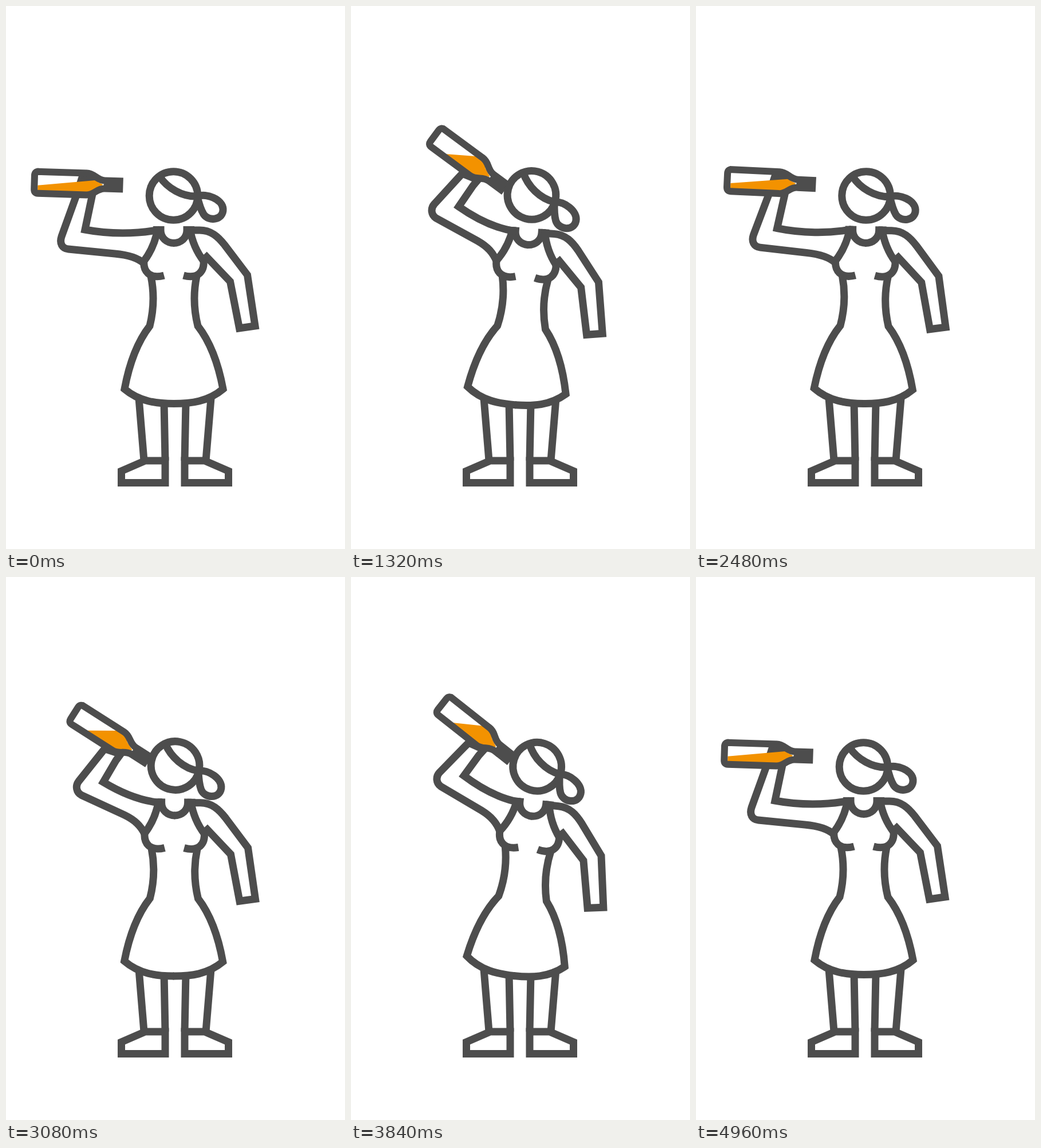
Recreate the animation shown at these times as an HTML page. Size 592 by 947 pixels, loop 5000 ms.

```html
<!DOCTYPE html>
<html lang="en">
<head>
<meta charset="utf-8">
<title>Drinking from a bottle</title>
<style>
  html, body { margin: 0; width: 100%; height: 100%; overflow: hidden; background: #fff; }
  svg { display: block; width: 100%; height: 100%; }
  .ink { fill: none; stroke: #4d4d4d; stroke-width: 13; stroke-miterlimit: 10; }
</style>
</head>
<body>
<svg viewBox="0 0 592 947">
  <defs>
    <clipPath id="hollow">
      <path d="M-150 -14H-64Q-55 -13 -50 -7L-35 0L-50 10Q-55 13 -64 14H-150Z"/>
    </clipPath>
    <g id="leg">
      <path d="M232 684L241 793M276 692L278 793"/>
      <path d="M278 793V831.5H201.5V811L243 793Z"/>
    </g>
    <g id="dressHalf">
      <path d="M265 388C261 412 251 432 240 446"/>
      <path d="M241 443C239 462 250 477 276 470"/>
      <path d="M253 471C259 500 258 530 251 558C230 585 215 625 207 668C233 690 263 693.5 294 693.5"/>
      <path d="M270 384V391C270 404 280 413.5 294 413.5"/>
    </g>
  </defs>
  <g class="ink">
    <use href="#leg"/>
    <use href="#leg" transform="matrix(-1 0 0 1 590 0)"/>
    <g id="body">
      <path id="arm"/>
      <path d="M320 391H338C358 391 370 402 382 417L421.5 469L435 558L407.5 562L391.5 480.5L346 433"/>
      <use href="#dressHalf"/>
      <use href="#dressHalf" transform="matrix(-1 0 0 1 586 0)"/>
      <path d="M257 390.5H271M315 390.5H329"/>
      <g id="bottle" stroke-width="12">
        <g clip-path="url(#hollow)"><path id="liquid" fill="#f39200" stroke="none"/></g>
        <path d="M-152 -19H-64C-50 -19 -46 -7 -32 -7H-6V7H-32C-46 7 -50 19 -64 19H-148Q-155 19 -155 12V-12Q-155 -19 -148 -19M-34 0H-5"/>
      </g>
      <g id="head">
        <circle cx="292.5" cy="331" r="42.3"/>
        <path d="M268 297C282 318 308 333 334 332C350 326 378 337 379 354C380 373 354 377 345 363C340 355 337 345 334 332"/>
      </g>
    </g>
  </g>
</svg>
<script>
const LOOP = 5000, STEP = 40;
const el = id => document.getElementById(id);

// Lean of the body in degrees and raise of the arm: [ms, value]
const LEAN = [[960, 0], [1320, 4.3], [1560, 6.1], [1760, 6.45], [1960, 6.3], [2080, 5.1],
  [2480, 0.9], [2700, 0], [3040, 0], [3080, 0.4], [3200, 1.9], [3400, 4.6], [3660, 6.3],
  [3840, 6.2], [4320, 1.75], [4600, 0.5], [4960, 0]];
const RAISE = [[960, 0], [1260, 1], [1960, 1], [2080, 0], [2690, 0], [3070, 1], [3860, 1], [4000, 0]];

const ARM = [
  "M268 390C228 398 180 398 138 390L151 328L154 302L132 302L123 330L97 402C93 414 98 423 109 424L190 432C213 434 230 439 241 449",
  "M270 391.5C233 389 200 375 168 356L190 318L198 307L170 298L162 308L125 355C119 363 121 374 130 379L205 413C224 422 234 432 241 446"
];
const LIQUID = [
  "M-149 5L-49 -7L-20 -30L-20 30L-149 30Z",
  "M-119 13L-77 -13.5L-20 -30L-20 30L-119 30Z"
];

const mix = (a, b, u) => a + (b - a) * u;

function morph([from, to], u) {
  const number = /-?\d+(\.\d+)?/g;
  const ends = to.match(number);
  let i = 0;
  return from.replace(number, n => mix(+n, +ends[i++], u).toFixed(2));
}

// Smooth curve through the keys that never overshoots them
function curve(keys, t) {
  const last = keys.length - 1;
  if (t <= keys[0][0]) return keys[0][1];
  if (t >= keys[last][0]) return keys[last][1];
  const i = keys.findIndex(k => k[0] > t) - 1;
  const rate = j => (keys[j + 1][1] - keys[j][1]) / (keys[j + 1][0] - keys[j][0]);
  const slope = j => {
    if (j === 0 || j === last) return 0;
    const a = rate(j - 1), b = rate(j);
    return a * b <= 0 ? 0 : 2 * a * b / (a + b);
  };
  const [t0, v0] = keys[i], [t1, v1] = keys[i + 1];
  const d = t1 - t0, u = (t - t0) / d, w = 1 - u;
  return v0 * w * w * (1 + 2 * u) + v1 * u * u * (3 - 2 * u)
    + d * u * w * (slope(i) * w - slope(i + 1) * u);
}

function draw(ms) {
  const t = Math.floor(ms % LOOP / STEP) * STEP;
  const lean = curve(LEAN, t), raise = curve(RAISE, t);
  const place = (id, value) => el(id).setAttribute("transform", value);

  place("body", `rotate(${lean} 293 622) translate(0 ${2.5 * raise})`);
  place("head", `translate(${raise} ${-4.5 * raise}) rotate(${11 * raise} 292.5 331)`);
  place("bottle", `translate(${mix(204.5, 248, raise)} ${mix(312.5, 318.5, raise)}) rotate(${mix(1.8, 32.1, raise)})`);
  el("arm").setAttribute("d", morph(ARM, raise));
  el("liquid").setAttribute("d", morph(LIQUID, raise));
}

const start = performance.now();
function tick() {
  draw(performance.now() - start);
  requestAnimationFrame(tick);
}
tick();
</script>
</body>
</html>
```
